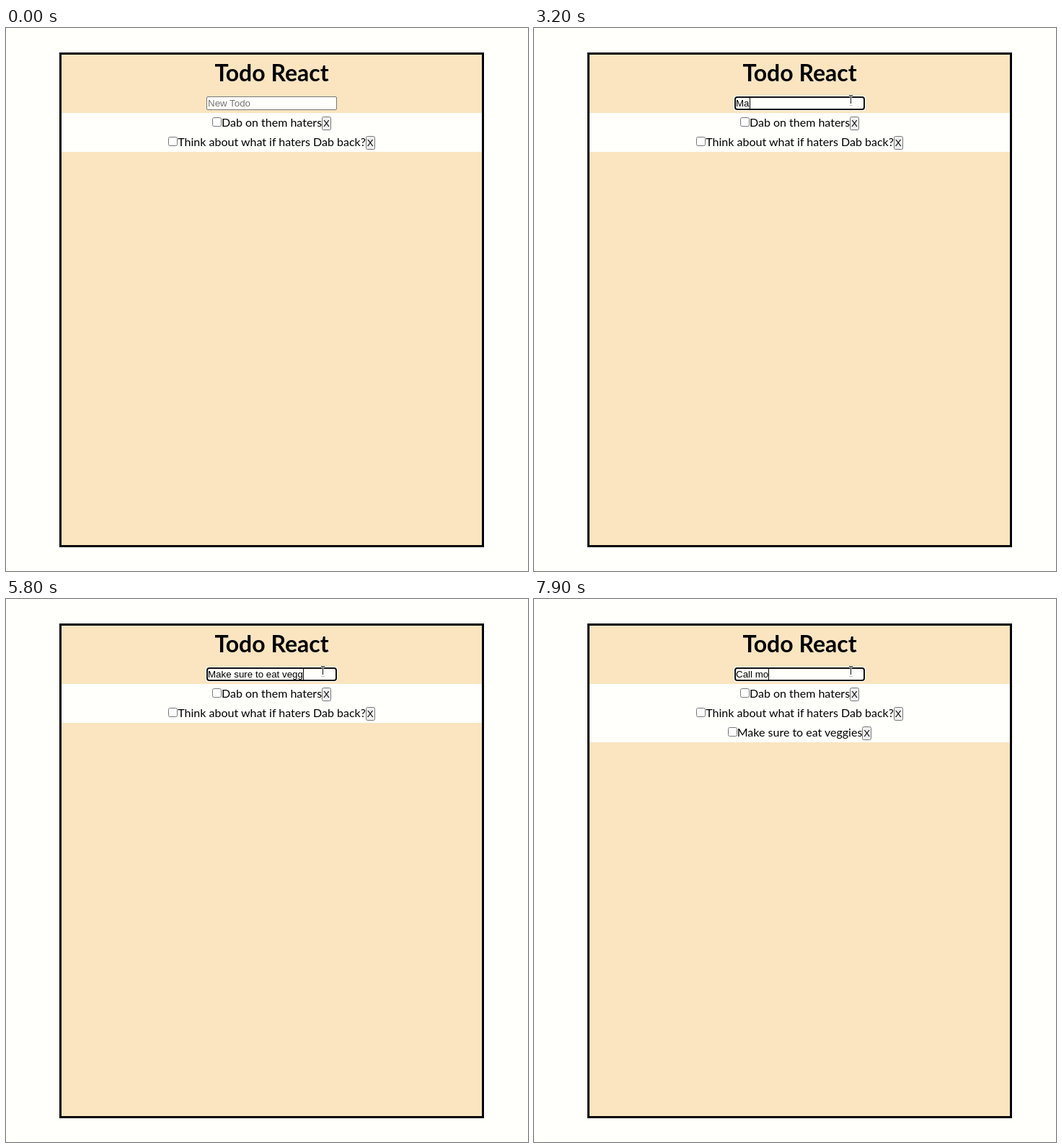
An HTML page for the animation above (8 s loop, 724 px wide and 754 px high).

```html
<!DOCTYPE html>
<html lang="en">
<head>
<meta charset="utf-8">
<title>Todo React</title>
<style>
  * { margin: 0; padding: 0; box-sizing: border-box; }
  html, body { width: 100%; height: 100%; overflow: hidden; background: #fffffc; }
  body { position: relative; font: 16px Lato, sans-serif; color: #000; pointer-events: none; }
  .app {
    position: absolute; left: 74px; top: 34px; width: 589px; height: 687px;
    border: 3px solid #000; background: #fae5c0;
  }
  h1 {
    position: absolute; left: 0; right: 0; top: 5px;
    font-size: 32px; line-height: 39px; text-align: center;
  }
  .field {
    position: absolute; left: 201px; top: 58px; width: 181px; height: 19px;
    padding: 1px; border: 1px solid #767676; border-radius: 2px; background: #fffffc;
    font: 13.3333px/15px "Liberation Sans", Arial, sans-serif; white-space: pre;
  }
  .field.hover { border-color: #4f4f4f; }
  .field.focus { outline: -webkit-focus-ring-color auto 1px; }
  .field.empty .value { color: #757575; }
  .caret { position: absolute; top: 1px; width: 1px; height: 15px; background: #000; }
  ul { position: absolute; left: 0; right: 0; top: 81px; list-style: none; background: #fffffc; }
  li { height: 27px; padding: 3px 0; text-align: center; white-space: nowrap; }
  li input { width: 13px; height: 13px; }
  li button { font: 13.3333px "Liberation Sans", Arial, sans-serif; }
  svg { position: absolute; left: 0; top: 0; overflow: visible; }
</style>
</head>
<body>
<div class="app">
  <h1>Todo React</h1>
  <div class="field"><span class="value"></span><i class="caret"></i></div>
  <ul></ul>
</div>
<svg id="arrow" width="13" height="20">
  <path d="M.7 .9V16l3.5-3.2 2.5 5.6 2.4-1-2.5-5.5h5z" fill="#000" stroke="#fff"/>
</svg>
<svg id="beam" width="8" height="16">
  <path d="M1 .5h2l.5.5.5-.5h2M3.5 1v12M1 13.5h5" fill="none" stroke="#fff" stroke-width="3" opacity=".75"/>
  <path d="M1 .5h2l.5.5.5-.5h2M3.5 1v11" fill="none" stroke="#111"/>
  <path d="M1 14.5h5" stroke="#c4c4c0"/>
</svg>
<script>
  const LOOP = 8000, FOCUS = 2200, SUBMIT = 6500;
  const $ = s => document.querySelector(s);
  const field = $('.field'), value = $('.value'), caret = $('.caret'), list = $('ul');
  const arrow = $('#arrow'), beam = $('#beam');

  const todos = ['Dab on them haters', 'Think about what if haters Dab back?', 'Make sure to eat veggies'];

  // Keystrokes: [time, typed text]
  const keys = [
    [2900, 'M'], [3200, 'a'], [3300, 'k'], [3400, 'e'],
    [3600, ' '], [3700, 's'], [3800, 'u'], [3900, 're'], [4000, ' '], [4100, 't'], [4200, 'o '],
    [4400, 'e'], [4500, 'a'], [4600, 't'], [4700, ' '],
    [4900, 'v'], [5100, 'e'], [5800, 'gg'], [6200, 'ie'], [6300, 's'],
    [7200, 'Ca'], [7300, 'l'], [7500, 'l'], [7600, ' '], [7700, 'm'], [7900, 'o']
  ];

  // Pointer positions: [time, x, y]
  const moves = [[800, 559, 115], [900, 503.5, 86.5], [1100, 466, 78], [1200, 436, 93]];

  for (const text of todos) {
    const li = document.createElement('li');
    const box = document.createElement('input');
    const del = document.createElement('button');
    box.type = 'checkbox';
    del.textContent = 'X';
    li.append(box, text, del);
    list.append(li);
  }

  function typedAt(t) {
    const start = t < SUBMIT ? 0 : SUBMIT;
    return keys.filter(k => k[0] >= start && k[0] <= t).map(k => k[1]).join('');
  }

  function placePointer(t) {
    const at = moves.filter(m => m[0] <= t).pop();
    const overField = t >= 1200;
    arrow.style.display = at && !overField ? '' : 'none';
    beam.style.display = overField ? '' : 'none';
    if (at) (overField ? beam : arrow).style.transform = `translate(${at[1]}px, ${at[2]}px)`;
  }

  function render(t) {
    const text = typedAt(t), focused = t >= FOCUS;
    value.textContent = text || 'New Todo';
    field.classList.toggle('empty', !text);
    field.classList.toggle('hover', t >= 1200);
    field.classList.toggle('focus', focused);
    caret.style.display = focused ? '' : 'none';
    caret.style.left = 1 + (text ? value.getBoundingClientRect().width : 0) + 'px';
    list.lastChild.style.display = t >= SUBMIT ? '' : 'none';
    placePointer(t);
  }

  const t0 = performance.now();
  function tick() {
    render((performance.now() - t0) % LOOP);
    requestAnimationFrame(tick);
  }
  tick();
</script>
</body>
</html>
```
